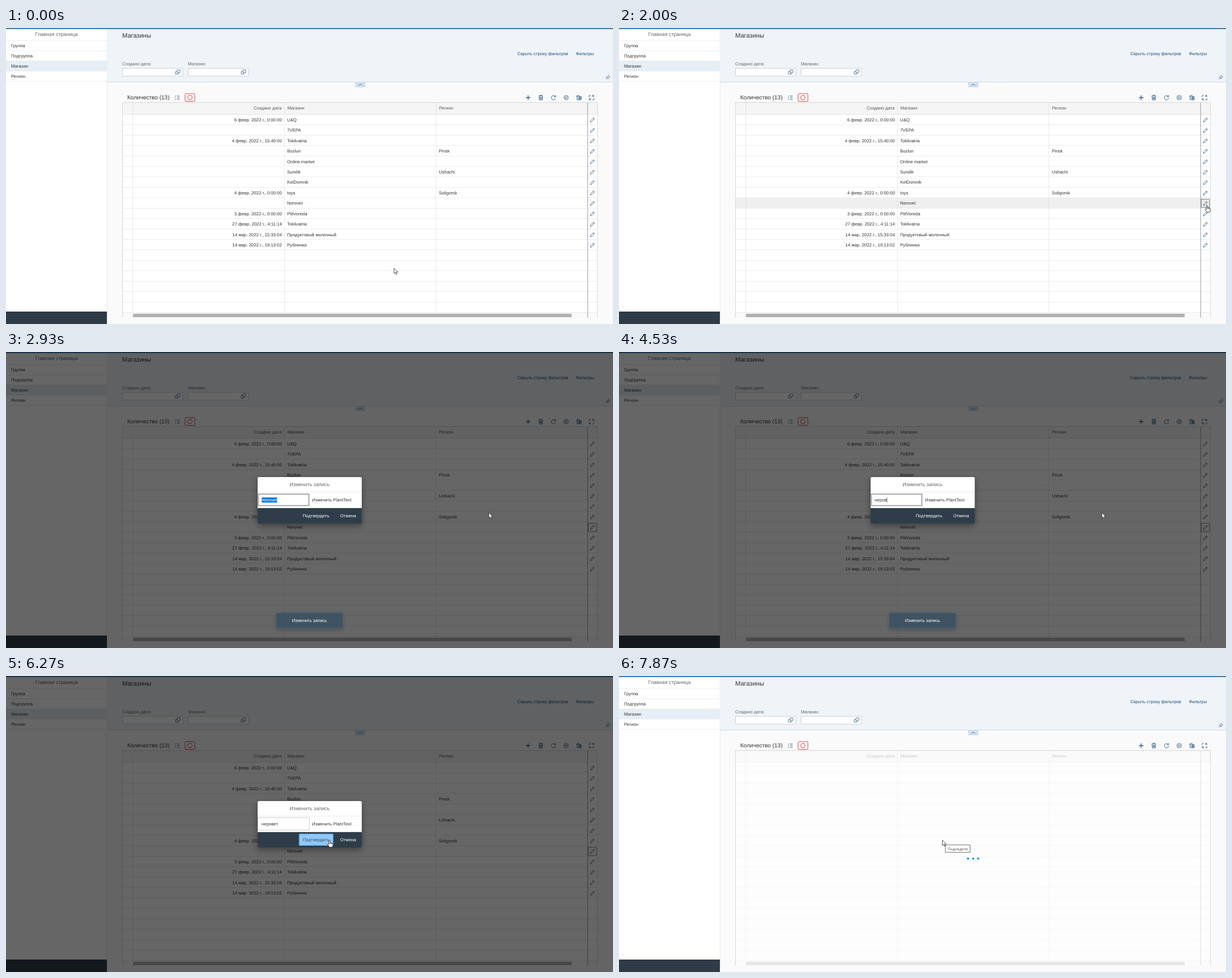
An HTML page for the animation above (8000 ms loop, 1071 by 523 pixels).

```html
<!DOCTYPE html>
<html lang="ru">
<head>
<meta charset="utf-8">
<title>Магазины</title>
<style>
html, body { margin: 0; width: 100%; height: 100%; overflow: hidden; background: #fafafa; }
svg { display: block; width: 1071px; height: 523px; }
text { font: 7.81px "Liberation Sans", Arial, sans-serif; fill: #333; text-rendering: geometricPrecision; white-space: pre; }
.icon { fill: none; stroke: #346187; stroke-width: .95; }
</style>
</head>
<body>
<svg id="stage" viewBox="0 0 1071 523" xmlns="http://www.w3.org/2000/svg"></svg>
<script>
const LOOP = 8000, TICK = 200 / 3;
const TOP = 152.5, ROW = 18.43, ROWS = 19;
const OLD_NAME = 'Nerovet', NEW_NAME = 'неровет';

const shops = [
  ['6 февр. 2022 г., 0:00:00', 'U&amp;Q', ''],
  ['', '7VEPA', ''],
  ['4 февр. 2022 г., 15:40:00', 'Toklivatria', ''],
  ['', 'Bozlun', 'Pinsk'],
  ['', 'Online market', ''],
  ['', 'Sundik', 'Ushachi'],
  ['', 'KelDomnik', ''],
  ['4 февр. 2022 г., 0:00:00', 'toys', 'Soligorsk'],
  ['', OLD_NAME, ''],
  ['3 февр. 2022 г., 0:00:00', 'PlitVoreda', ''],
  ['27 февр. 2022 г., 4:11:14', 'Toklivatria', ''],
  ['14 мар. 2022 г., 15:33:04', 'Продуктовый молочный', ''],
  ['14 мар. 2022 г., 19:13:02', 'Рублинка', '']
];

const rect = (x, y, w, h, fill, extra = '') =>
  `<rect x="${x}" y="${y}" width="${w}" height="${h}" fill="${fill}" ${extra}/>`;
const text = (x, y, s, { size = 7.81, fill = '#333', anchor = 'start', extra = '' } = {}) =>
  `<text x="${x}" y="${y}" text-anchor="${anchor}" style="font-size:${size}px;fill:${fill}" ${extra}>${s}</text>`;
const icon = (x, y, d, extra = '') =>
  `<path class="icon" transform="translate(${x} ${y})" d="${d}" ${extra}/>`;
const hline = (x, y, w, c) => rect(x, y - .3, w, .6, c);
const vline = (x, y, h, c) => rect(x - .3, y, .6, h, c);

const glyph = {
  copy: 'M-1-4H4V1H-1ZM-1-1H-4V3.5H1V1',
  pin: 'M.5-3.5L3.5-.5M1-3L-1-.7L-3-.6L.6 3L.7 1L3-1M-1.2 1.2L-3.8 3.8',
  list: 'M-4-3l.8.8l1.3-1.4M-4 0l.8.8l1.3-1.4M-4 3l.8.8l1.3-1.4M0-2.8H4.3M0 .2H4.3M0 3.2H4.3',
  plus: 'M-4 0H4M0-4V4',
  bin: 'M-4-3H4M-1.4-3V-4.3H1.4V-3M-3-2.6L-2.6 4.2H2.6L3-2.6M-1.1-1V2.7M.1-1V2.7M1.3-1V2.7',
  reload: 'M3.4-1.8A3.8 3.8 0 1 0 3.8 1.2M3.6-4.4V-1.6H.8',
  gear: 'M0-4.2L1.3-3.2L3-3L3.2-1.3L4.2 0L3.2 1.3L3 3L1.3 3.2L0 4.2L-1.3 3.2L-3 3L-3.2 1.3L-4.2 0L-3.2-1.3L-3-3L-1.3-3.2ZM1.4 0A1.4 1.4 0 1 1-1.4 0A1.4 1.4 0 1 1 1.4 0',
  sheet: 'M-1-1.5H4.3V3.8H-3V-3.8H.5L2.3-2V-1.5M-4.3-2H-1M-1 .3H4.3M-1 2H4.3M1.2-1.5V3.8',
  full: 'M1-4H4V-1M4-4L1-1M-1 4H-4V1M-4 4L-1 1M-4-1V-4H-1.6M4 1V4H1.6',
  pencil: 'M-3.7 3.8L-3 1.2L2-3.7L3.7-2L-1.2 3ZM.9-2.6L2.6-.9'
};

function sidebar() {
  const items = ['Группа', 'Подгруппа', 'Магазин', 'Регион'];
  return rect(0, 0, 178, 523, '#fff') + vline(178.2, 0, 523, '#dcdcdc') +
    rect(0, 58.3, 178, 17.6, '#e6eff6') +
    text(89, 14, 'Главная страница', { size: 8.93, fill: '#666', anchor: 'middle' }) +
    hline(0, 22.2, 178, '#dedede') +
    items.map((s, i) => text(9, 34 + 18 * i, s) + hline(0, 40.3 + 17.9 * i, 178, '#e2e2e2')).join('') +
    rect(0, 501, 178, 22, '#2f3c48');
}

function filterBar() {
  const field = (x, label) => text(x, 65.5, label, { fill: '#666' }) +
    rect(x + .4, 71.2, 106.6, 13.8, '#fff', 'stroke="#bfbfbf" stroke-width=".7"') +
    icon(x + 98, 78, glyph.copy, 'style="stroke-width:.8"');
  const link = { fill: '#1f4d75' };
  return rect(178.5, 0, 892.5, 95.4, '#eff4f9') + hline(178.5, 95.6, 892.5, '#a9c6de') +
    text(205, 17, 'Магазины', { size: 11.16 }) +
    text(902.3, 47.6, 'Скрыть строку фильтров', link) + text(1005.5, 47.6, 'Фильтры', link) +
    field(205, 'Создано дата:') + field(321, 'Магазин:') +
    icon(1062, 87, glyph.pin, 'style="stroke-width:.8"') +
    rect(616, 96, 18, 8.7, '#d1e0ee') +
    icon(625, 100.4, 'M-3.5 1.6L0-1.6L3.5 1.6', 'style="stroke-width:.8"');
}

function toolbar() {
  const tools = ['plus', 'bin', 'reload', 'gear', 'sheet', 'full'];
  return text(214, 125.8, 'Количество (13)', { size: 10.04 }) +
    icon(302, 123, glyph.list) +
    rect(316, 116, 17.2, 13.6, '#fff', 'rx="1.5" stroke="#cc3333" stroke-width=".9"') +
    '<circle cx="324.6" cy="122.9" r="4" fill="none" stroke="#cc3333" stroke-width=".9"/>' +
    tools.map((k, i) => icon(921.3 + 22.35 * i, 123, glyph[k], k === 'plus' ? 'style="stroke-width:1.3"' : '')).join('');
}

function table() {
  const head = { fill: '#555' };
  let s = rect(205.6, 131.8, 838, 380, '#fafafa') + rect(205.6, 132, 838, 20.5, '#f5f5f5') +
    rect(205.6, TOP, 838, ROW * ROWS, '#fff') +
    rect(205.6, 0, 838, ROW, '#efefef', 'id="hover"');
  for (let i = 1; i <= ROWS; i++) s += hline(205.6, TOP + ROW * i, 838, '#dfdfdf');
  s += hline(205.6, TOP, 838, '#d2d2d2');
  for (const x of [223.5, 491.2, 758.7]) s += vline(x, 132, 371, '#dcdcdc');
  s += text(486.4, 144.2, 'Создано дата', { ...head, anchor: 'end' }) +
    text(496.4, 144.2, 'Магазин', head) + text(764, 144.2, 'Регион', head);
  s += '<g id="data">' + shops.map(([date, name, region], i) => {
    const y = TOP + ROW * (i + .5);
    return text(486.8, y + 3.1, date, { anchor: 'end' }) + text(496, y + 3.1, name) +
      text(763.8, y + 3.1, region) + icon(1034.7, y + .7, glyph.pencil, 'style="stroke-width:.85"');
  }).join('') + '</g>';
  s += rect(1025.8, 132, .9, 380, '#909090') + rect(224, 504.8, 774, 6.2, '#b1b1b1');
  s += rect(1027.4, 302.8, 14.4, 14.2, 'none', 'id="focus" stroke="#222" stroke-width=".9" stroke-dasharray="1.2 .8"');
  s += rect(206, 132.3, 837.3, 379.7, '#fdfdfd', 'id="veil"');
  return s + hline(205.6, 131.8, 838, '#bdbdbd') +
    vline(205.6, 131.8, 380.2, '#c6c6c6') + vline(1043.5, 131.8, 380.2, '#c6c6c6');
}

function dialog() {
  const white = { fill: '#fff', anchor: 'middle' };
  return rect(0, 0, 1071, 523, '#000', 'opacity=".6"') +
    '<g id="toast">' + rect(476.8, 460.6, 117.4, 27.2, '#405262', 'rx="1.6" filter="url(#soft)" stroke="#52697d" stroke-width=".6"') +
    text(535.4, 476.7, 'Изменить запись', white) + '</g>' +
    rect(444, 221, 183.7, 82, '#2f3c48', 'rx="2.2" filter="url(#deep)"') +
    '<path d="M444 275.7V223.2a2.2 2.2 0 0 1 2.2-2.2h179.3a2.2 2.2 0 0 1 2.2 2.2V275.7Z" fill="#fff"/>' +
    hline(444, 247.6, 183.7, '#dcdcdc') +
    text(535.5, 237.2, 'Изменить запись', { size: 8.93, fill: '#666', anchor: 'middle' }) +
    rect(444.6, 250.2, 90.6, 22, '#fff', 'id="box"') +
    rect(451, 257, 0, 9, '#0078d7', 'id="mark"') +
    text(451, 264, '', { extra: 'id="value"' }) +
    rect(0, 257, .7, 8.8, '#222', 'id="caret"') +
    text(540, 264, 'Изменить PlantText') +
    rect(517.2, 279, 60, 20.4, '#91c8f6', 'id="press" rx="1" stroke="#4a9fe0" stroke-width="1"') +
    text(547, 291.8, 'Подтвердить', { ...white, extra: 'id="ok"' }) +
    text(603.7, 291.8, 'Отмена', white);
}

function busy() {
  return '<g id="dots">' + [0, 1, 2].map(i => `<circle cx="${615.8 + 8.95 * i}" cy="322.6" fill="#0a9ad6"/>`).join('') + '</g>' +
    '<g id="tip">' + rect(575.8, 298.4, 43.6, 13, '#fff', 'stroke="#555" stroke-width=".8"') +
    `<text x="580" y="307.5" style="font:6.5px 'Open Sans','Noto Sans',sans-serif;fill:#444">Подождите</text></g>`;
}

const pointers =
  '<path id="arrow" d="M0 0V9.4L2.2 7.4L3.8 10.9L5.3 10.2L3.8 6.8H6.7Z" fill="#fff" stroke="#111" stroke-width=".7"/>' +
  '<path id="hand" d="M-1 7.3V1a1 1 0 0 1 2 0V4.6q1-.6 1.7.3q1-.5 1.6.4q1.5-.2 1.6 1.1V9.3q0 1.5-.9 3.2H0Q-.9 10.9-3 8q-.3-1.3.7-1.3q.8.1 1.3 1ZM1 4.6V6.6M2.7 4.9V6.7M4.3 5.3V6.8" fill="#fff" stroke="#111" stroke-width=".7"/>';

const stage = document.getElementById('stage');
stage.innerHTML = `<defs>
  <filter id="deep" x="-20%" y="-30%" width="140%" height="170%"><feDropShadow dx="0" dy="4" stdDeviation="6" flood-opacity=".4"/></filter>
  <filter id="soft" x="-20%" y="-50%" width="140%" height="220%"><feDropShadow dx="0" dy="3" stdDeviation="3.5" flood-opacity=".25"/></filter>
</defs>` + rect(0, 0, 1071, 523, '#fafafa') + sidebar() + filterBar() + toolbar() + table() +
  rect(0, 0, 1071, 2, '#427cac') + `<g id="dialog">${dialog()}</g>` + busy() + pointers;

const el = {};
stage.querySelectorAll('[id]').forEach(n => el[n.id] = n);
const set = (n, attrs) => { for (const k in attrs) n.setAttribute(k, attrs[k]); };
const show = (n, on) => n.setAttribute('visibility', on ? 'inherit' : 'hidden');
const clamp = v => Math.max(0, Math.min(1, v));
const ease = v => v * v * (3 - 2 * v);

// Pointer stops: tick, x, y
const path = [
  [1, 684.7, 424.4], [14, 1029, 272], [20, 1026.5, 309], [23, 1026.5, 309], [26, 1037.4, 313],
  [31, 1037.4, 313], [32, 1018, 309], [37, 852, 284], [78, 852, 284], [91, 570.6, 290]
];
const keys = [56, 58, 59, 60, 68, 72, 75];

function pointerAt(n) {
  const i = path.findIndex(p => p[0] > n);
  if (i === 0) return path[0].slice(1);
  if (i < 0) return path[path.length - 1].slice(1);
  const [a, b] = [path[i - 1], path[i]];
  const k = ease((n - a[0]) / (b[0] - a[0]));
  return [a[1] + (b[1] - a[1]) * k, a[2] + (b[2] - a[2]) * k];
}

function draw(ms) {
  const n = Math.floor((ms + 5) / TICK);
  const within = (a, b) => n >= a && n < b;
  const [x, y] = pointerAt(n);
  const modal = within(32, 95);

  const hand = within(24, 32) || within(92, 95);
  show(el.hand, hand);
  show(el.arrow, !hand);
  set(hand ? el.hand : el.arrow, { transform: `translate(${x} ${y})` });

  const row = Math.floor((y - TOP) / ROW);
  show(el.hover, !modal && n < 97 && row >= 0 && row < shops.length);
  set(el.hover, { y: TOP + ROW * row });
  show(el.data, n < 95);
  show(el.focus, within(30, 95));

  show(el.dialog, modal);
  set(el.toast, { opacity: clamp((91 - n) / 13) });
  const focused = within(35, 94), marked = within(44, 56), pressed = n >= 94;
  set(el.box, focused
    ? { x: 445.4, y: 251, width: 89, height: 20.4, stroke: '#9c9c9c', 'stroke-width': 1.7 }
    : { x: 444.6, y: 250.2, width: 90.6, height: 22, stroke: '#bfbfbf', 'stroke-width': .8 });
  const typed = keys.filter(k => k <= n).length;
  el.value.textContent = typed ? NEW_NAME.slice(0, typed) : OLD_NAME;
  el.value.style.fill = marked ? '#fff' : '#333';
  const w = el.value.getComputedTextLength();
  set(el.mark, { width: w });
  show(el.mark, marked);
  set(el.caret, { x: 451 + w });
  show(el.caret, typed && focused);
  show(el.press, pressed);
  el.ok.style.fill = pressed ? '#32506b' : '#fff';

  const load = clamp((n - 96) / 13);
  set(el.veil, { opacity: load * .7 });
  set(el.dots, { opacity: load });
  [...el.dots.children].forEach((dot, i) => {
    const p = clamp((n - 104 - 2.5 * i) / 9);
    set(dot, { r: 1.9 + 1.6 * Math.sin(Math.PI * p) });
  });
  show(el.tip, n >= 105);
}

function frame() {
  draw(performance.now() % LOOP);
  requestAnimationFrame(frame);
}
frame();
</script>
</body>
</html>
```
